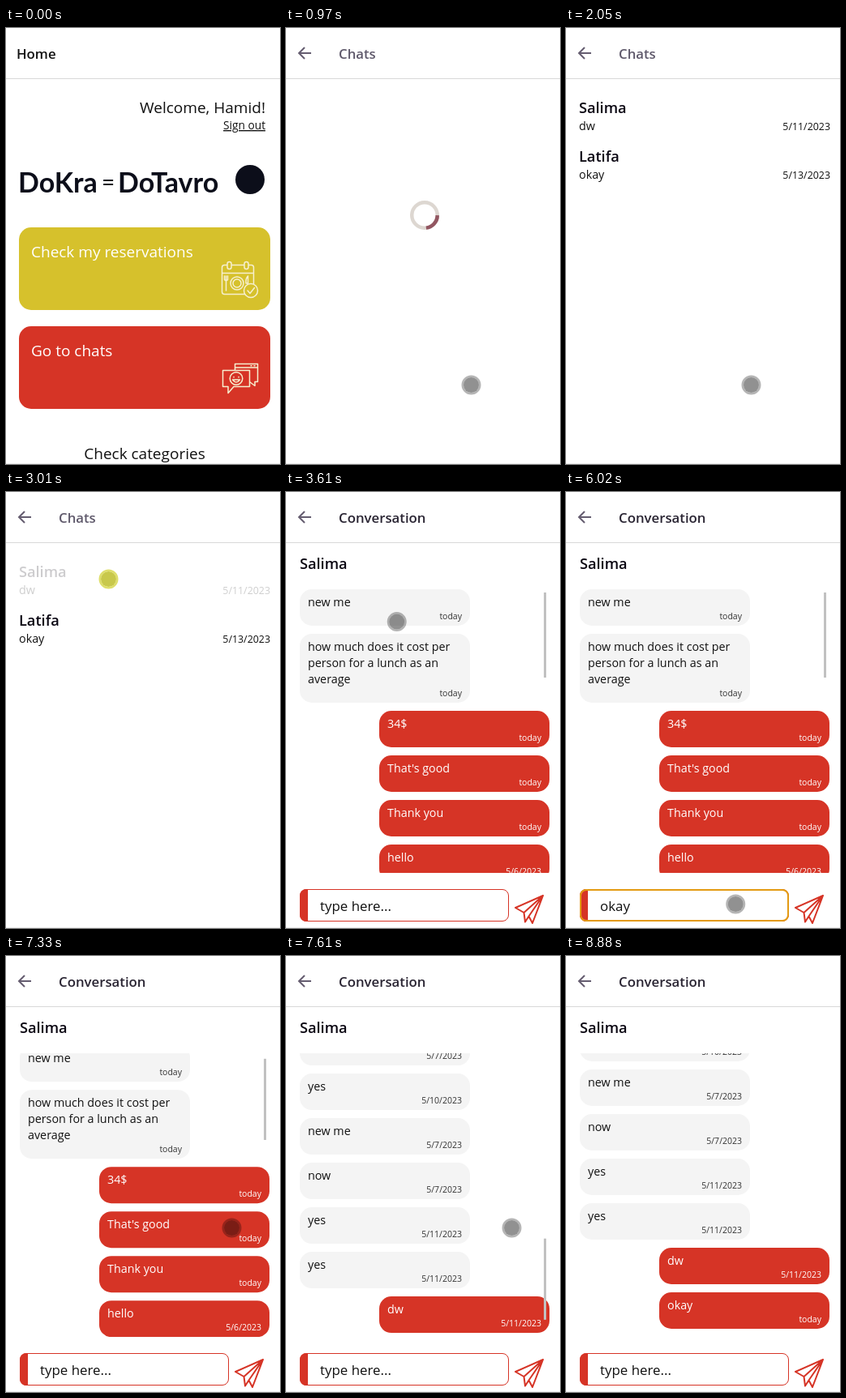
Recreate the animation shown at these times as an HTML page. Size 338x538 px, loop 9.72 s.

```html
<!DOCTYPE html>
<html lang="en">
<head>
<meta charset="utf-8">
<title>Chat walkthrough</title>
<style>
html, body { margin: 0; width: 100%; height: 100%; overflow: hidden; background: #fff; }
svg { display: block; }
text { font-family: "Open Sans", "Noto Sans", sans-serif; fill: #111; white-space: pre; }
.title { font-size: 16.8px; font-weight: 600; }
.big { font-size: 19px; }
.name { font-size: 18.2px; font-weight: 600; fill: #0a0612; }
.body { font-size: 14.3px; }
.date { font-size: 12.4px; }
.small { font-size: 10.5px; fill: #333; }
.field { font-size: 16.9px; }
.end { text-anchor: end; }
.mid { text-anchor: middle; }
.white, .mine text { fill: #fff; }
.brand { font: 700 34px Lato, sans-serif; fill: #0c0e1a; }
.line { fill: none; stroke-linecap: round; stroke-linejoin: round; }
.icon { stroke: #f6efcf; stroke-width: 1.5; }
</style>
</head>
<body>
<svg width="338" height="538" viewBox="0 0 338 538">
  <defs>
    <clipPath id="window"><rect x="0" y="120" width="338" height="350"/></clipPath>
    <path id="back" class="line" d="M31 31H16M23 24L16 31L23 38" stroke="#655d70" stroke-width="2" style="stroke-linecap:butt;stroke-linejoin:miter"/>
  </defs>
  <rect width="338" height="538" fill="#fff"/>
  <rect y="62" width="338" height="1" fill="#d8d8d8"/>
  <rect y="537" width="338" height="1" fill="#efefef"/>

  <g id="home">
    <text class="title" x="13" y="38">Home</text>
    <text class="big end" x="320" y="105">Welcome, Hamid!</text>
    <text class="end" x="320" y="125" font-size="13.7" text-decoration="underline">Sign out</text>
    <text class="brand" x="15" y="203">DoKra</text>
    <text class="brand" x="118" y="200" style="font-size:28px;font-weight:400">=</text>
    <text class="brand" x="138" y="203">DoTavro</text>
    <circle cx="301" cy="187" r="18" fill="#0c0e1a"/>

    <rect x="16" y="246" width="310" height="102" rx="15" fill="#d6c12c"/>
    <text class="big white" x="31" y="283">Check my reservations</text>
    <g class="line icon">
      <rect x="266.5" y="292.5" width="39" height="36" rx="3"/>
      <path d="M267 302.500H305"/>
      <rect x="273" y="288.500" width="5" height="9" rx="2.500" fill="#d6c12c"/>
      <rect x="294" y="288.500" width="5" height="9" rx="2.500" fill="#d6c12c"/>
      <circle cx="285" cy="315" r="8"/><circle cx="285" cy="315" r="5"/>
      <path d="M269.500 306V310.500Q271.500 313 273.500 310.500V306M271.500 306V324M298.500 324V306Q295.500 309 296 315H298.500"/>
      <circle cx="302" cy="324" r="8.500" fill="#d6c12c"/>
      <path d="M298 324L301 327.500L306.500 320.500"/>
    </g>

    <g id="chatButton">
      <rect x="16" y="368" width="310" height="102" rx="15" fill="#d63426"/>
      <text class="big white" x="31" y="405">Go to chats</text>
      <g class="line icon">
        <path d="M282.500 422V414.500H310.500V436.500H307V441.500L301 437M283 419H310M302 416.800H303M306 416.800H307"/>
        <path d="M267.500 422.500H300.500V442.500H281L274 450.500V442.500H267.500Z" fill="#d63426"/>
        <circle cx="284" cy="432.500" r="7.800"/>
        <path d="M281 430.500V431M287 430.500V431M279.500 434Q284 440 288.500 434Z"/>
      </g>
    </g>
    <text class="big mid" x="171" y="532">Check categories</text>
  </g>

  <g id="chats">
    <use href="#back"/>
    <text class="title" x="65" y="38" style="fill:#5f596b">Chats</text>
    <g id="spinner" class="line" stroke="#925661" stroke-width="4.5" style="stroke-linecap:butt">
      <circle cx="171" cy="231" r="15.75" stroke="#ddd7d1"/>
      <circle cx="171" cy="231" r="15.75" stroke-dasharray="22.5 90"/>
    </g>
    <g id="people">
      <g id="firstRow">
        <text class="name" x="16" y="105">Salima</text>
        <text class="body" x="16" y="126">dw</text>
        <text class="date end" x="326" y="126">5/11/2023</text>
      </g>
      <text class="name" x="16" y="165">Latifa</text>
      <text class="body" x="16" y="186">okay</text>
      <text class="date end" x="326" y="186">5/13/2023</text>
    </g>
  </g>

  <g id="talk">
    <use href="#back"/>
    <text class="title" x="65" y="38" style="fill:#292432">Conversation</text>
    <text class="name" x="17" y="95">Salima</text>
    <g id="messages">
      <g clip-path="url(#window)"><g id="list"></g></g>
      <rect id="thumb" x="318" y="124" width="3" height="105" fill="#c1c1c1"/>
    </g>
    <rect x="17.5" y="490.5" width="257" height="39" rx="7.500" fill="#fff" stroke="#d63426"/>
    <path d="M27 490H25a8 8 0 0 0-8 8v24a8 8 0 0 0 8 8h2z" fill="#d63426"/>
    <rect id="focus" x="18" y="491" width="256" height="38" rx="7" fill="none" stroke="#e39a12" stroke-width="2"/>
    <text id="field" class="field" x="42" y="517"></text>
    <rect id="caret" y="499" width="1" height="22" fill="#111"/>
    <path id="send" class="line" d="M317 498L283 513L293.500 519L295 530.500L299.500 523.500L304 532Z M317 498L293.500 519M317 498L299.500 523.500" stroke="#d63426" stroke-width="2"/>
  </g>

  <g id="dot">
    <circle id="core" r="9.500"/>
    <circle id="ring" r="10.750" fill="none" stroke-width="2.500"/>
  </g>
</svg>
<script>
const LOOP = 9720;
const $ = id => document.getElementById(id);
const show = (id, on) => $(id).setAttribute('visibility', on ? 'inherit' : 'hidden');
const set = (id, attrs) => { for (const k in attrs) $(id).setAttribute(k, attrs[k]); };
const clamp = v => Math.max(0, Math.min(1, v));
const ease = p => p * p * (3 - 2 * p);
const within = (t, a, b) => t >= a && t < b;

// "text|date", a leading ">" marks the user's own messages
const chat = [
  'new me|today',
  'how much does it cost per/person for a lunch as an/average|today',
  '>34$|today', ">That's good|today", '>Thank you|today', '>hello|5/6/2023',
  '>hello|5/6/2023', 'hello|5/6/2023', 'yes|5/6/2023', '>okay|5/6/2023',
  '>thank you|5/6/2023', 'hello|5/7/2023', 'yes|5/7/2023', 'okay|5/7/2023',
  'yes|5/10/2023', 'new me|5/7/2023', 'now|5/7/2023', 'yes|5/11/2023',
  'yes|5/11/2023', '>dw|5/11/2023', '>okay|today'
];
const VIEW = 350;
let height = 0;
$('list').innerHTML = chat.map(entry => {
  const mine = entry[0] === '>';
  const [text, date] = entry.slice(mine ? 1 : 0).split('|');
  const lines = text.split('/');
  const x = mine ? 115 : 17, y = 120 + height, h = 25 + 20 * lines.length;
  height += h + 10;
  return `<g class="${mine ? 'mine' : ''}">
    <rect x="${x}" y="${y}" width="210" height="${h}" rx="15" fill="${mine ? '#d63426' : '#f4f4f4'}"/>
    ${lines.map((s, i) => `<text class="body" x="${x + 10}" y="${y + 21 + 20 * i}">${s}</text>`).join('')}
    <text class="small end" x="${x + 200}" y="${y + h - 8}">${date}</text></g>`;
}).join('');

// pointer path: time, x, y
const path = [
  [260, 296.5, 483.5], [590, 228.5, 440.5],
  [2270, 228.5, 440.5], [2490, 197, 303], [2640, 169, 155], [2790, 126.5, 107.5],
  [3550, 126.5, 107.5], [3750, 160, 280], [3950, 188, 450], [4090, 157.5, 511.5],
  [5960, 157.5, 511.5], [6020, 209, 508.5], [6460, 313.5, 502],
  [6840, 313.5, 502], [7130, 278.5, 335.5]
];
const presses = [[820, 890], [3010, 3130], [4430, 4560], [6730, 6800]];

function pointer(t) {
  let i = path.findIndex(p => p[0] > t);
  if (i < 0) i = path.length - 1;
  const a = path[Math.max(0, i - 1)], b = path[i];
  const p = clamp((t - a[0]) / (b[0] - a[0] || 1));
  return [a[1] + (b[1] - a[1]) * p, a[2] + (b[2] - a[2]) * p];
}

// touch feedback: dims at once, recovers after release
function dim(id, t, [down, up]) {
  const o = t < down ? 1 : 0.2 + 0.8 * ease(clamp((t - up) / 250));
  set(id, { opacity: o });
}

function drawPointer(t) {
  const [x, y] = pointer(t);
  const down = presses.some(([a, b]) => within(t, a, b));
  show('dot', within(t, 260, 8880));
  set('dot', { transform: `translate(${x} ${y})`, opacity: t < 8810 ? 1 : 0.5 });
  set('core', { fill: down ? 'rgba(186,186,30,.8)' : 'rgba(0,0,0,.43)' });
  set('ring', { stroke: down ? 'rgba(202,202,20,.63)' : 'rgba(0,0,0,.29)' });
}

function drawField(t) {
  const keys = [4760, 4860, 4960, 5230];
  const active = within(t, 4560, 6800);
  const typed = active ? 'okay'.slice(0, keys.filter(k => t >= k).length) : '';
  const field = $('field');
  const value = typed || 'type here...';
  if (field.textContent !== value) field.textContent = value;
  show('focus', active && t < 6730);
  show('caret', within(t, 4560, 5690) || within(t, 6190, 6690));
  set('caret', { x: typed ? 42 + field.getComputedTextLength() : 42 });
}

function drawList(t) {
  const content = t < 6800 ? height - 55 : height;
  const scroll = ease(clamp((t - 7308) / 362)) * (height - VIEW);
  const track = 342, size = track * VIEW / content;
  set('list', { transform: `translate(0 ${-scroll})` });
  set('thumb', {
    y: 124 + (track - size) * scroll / (content - VIEW),
    height: size,
    opacity: t < 8070 ? 1 : t < 8210 ? 0.5 : 0
  });
}

function render(t) {
  show('home', t < 950);
  show('chats', within(t, 950, 3210));
  show('talk', t >= 3210);
  show('spinner', within(t, 950, 2050));
  show('people', within(t, 2050, 3210));
  show('messages', t >= 3340);
  set('spinner', { transform: `rotate(${(t - 970) * 0.48} 171 231)` });
  dim('chatButton', t, presses[0]);
  dim('firstRow', t, presses[1]);
  dim('send', t, presses[3]);
  drawList(t);
  if (t >= 3210) drawField(t);
  else { show('focus', false); show('caret', false); }
  drawPointer(t);
}

const start = performance.now();
function tick() {
  render((performance.now() - start) % LOOP);
  requestAnimationFrame(tick);
}
tick();
</script>
</body>
</html>
```
